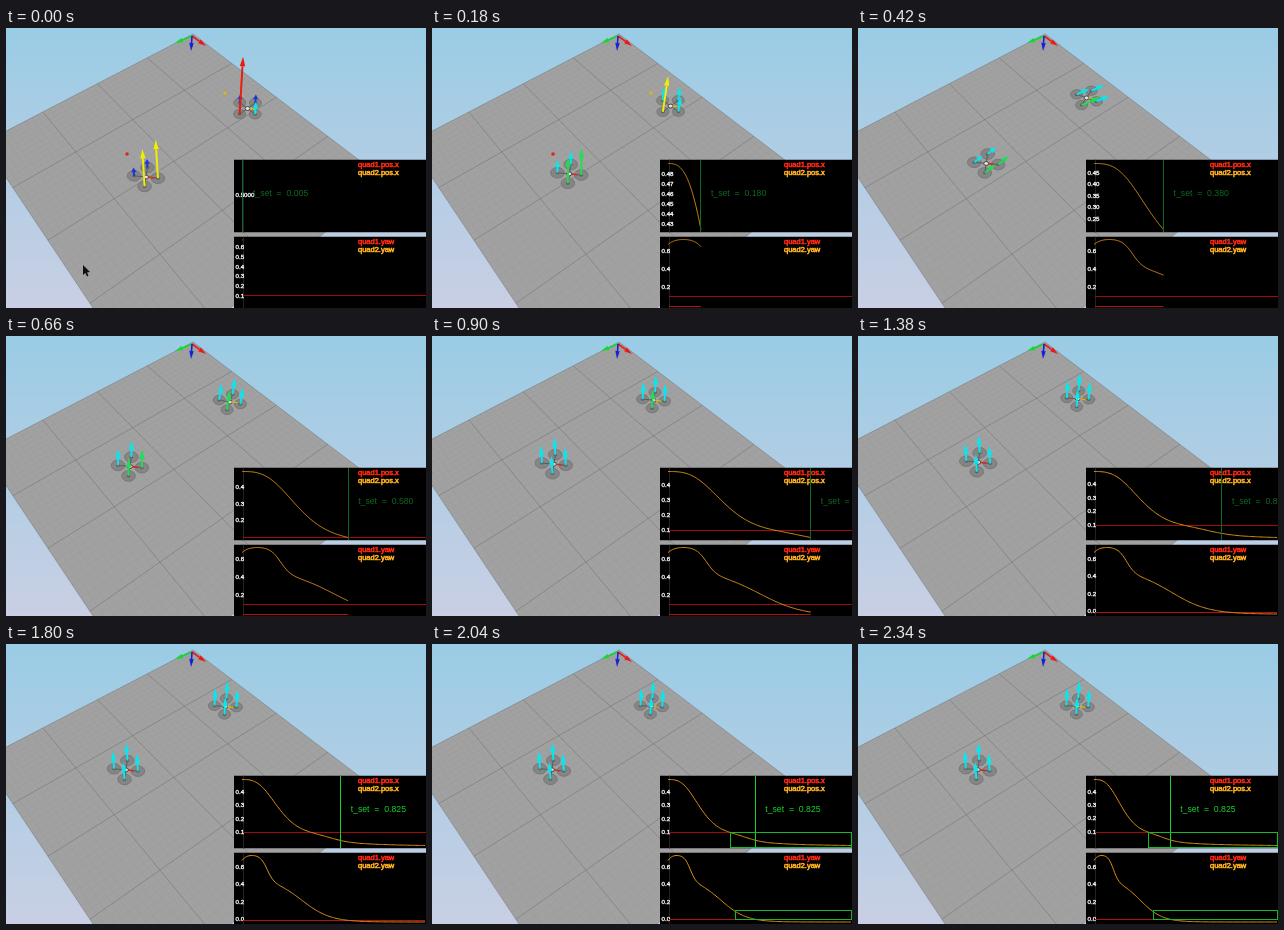
An HTML page with a canvas for the animation above (2.4 s loop, 420 by 280 pixels).

```html
<!DOCTYPE html>
<html lang="en">
<head>
<meta charset="utf-8">
<title>Two quadrotors settling</title>
<style>
html, body { margin: 0; width: 100%; height: 100%; overflow: hidden; }
canvas { display: block; width: 420px; height: 280px; }
</style>
</head>
<body>
<canvas id="stage" width="420" height="280"></canvas>
<script>
const ctx = document.getElementById('stage').getContext('2d');
const STEP = 60, LOOP = 2400, SETTLED = 0.825, LIMIT = 0.095, AXIS = 236;

const bump = (x, center, width) => Math.exp(-(((x - center) / width) ** 2));
const drop = (x, center, width) => 1 / (1 + Math.exp((x - center) / width));
const snap = v => Math.floor(v) + .5;

// Simulated responses over simulation time
const posX = t => .49 / (1 + (t / .336) ** 3) + .022 * bump(t, .65, .18) - .004 * t;
const yaw = t => .29 * drop(t, .21, .028) + .5 * drop(t, .5, .12) - .077 * Math.exp(-t / .04) - .033;

function line(x0, y0, x1, y1, color, width = 1) {
  ctx.strokeStyle = color;
  ctx.lineWidth = width;
  ctx.beginPath();
  ctx.moveTo(x0, y0);
  ctx.lineTo(x1, y1);
  ctx.stroke();
}
function polygon(points, color) {
  ctx.fillStyle = color;
  ctx.beginPath();
  points.forEach(p => ctx.lineTo(p[0], p[1]));
  ctx.closePath();
  ctx.fill();
}
function ellipse(x, y, rx, ry, fill, stroke) {
  ctx.beginPath();
  ctx.ellipse(x, y, rx, ry, 0, 0, 7);
  ctx.fillStyle = fill;
  ctx.fill();
  if (stroke) {
    ctx.strokeStyle = stroke;
    ctx.lineWidth = 1;
    ctx.stroke();
  }
}
function text(str, x, y, size, color, weight = 0) {
  ctx.font = size + 'px "Liberation Sans", Arial, sans-serif';
  ctx.textBaseline = 'middle';
  ctx.fillStyle = ctx.strokeStyle = color;
  ctx.lineWidth = weight;
  ctx.fillText(str, x, y);
  if (weight) ctx.strokeText(str, x, y);
}
function arrow(x, y, dx, dy, color, width) {
  const len = Math.hypot(dx, dy), ux = dx / len, uy = dy / len;
  const head = Math.min(len * .55, width * 5), half = width * 1.4;
  const nx = x + dx - ux * head, ny = y + dy - uy * head;
  line(x, y, nx, ny, color, width);
  polygon([[x + dx, y + dy], [nx - uy * half, ny + ux * half], [nx + uy * half, ny - ux * half]], color);
}

// Floor: projective map of the unit square
const FAR = [187, 6], RIGHT = [382, 154], NEAR = [135, 352], LEFT = [-23, 115];
const project = (() => {
  const sx = FAR[0] - RIGHT[0] + NEAR[0] - LEFT[0], sy = FAR[1] - RIGHT[1] + NEAR[1] - LEFT[1];
  const ax = RIGHT[0] - NEAR[0], ay = RIGHT[1] - NEAR[1];
  const bx = LEFT[0] - NEAR[0], by = LEFT[1] - NEAR[1];
  const det = ax * by - bx * ay, g = (sx * by - bx * sy) / det, h = (ax * sy - sx * ay) / det;
  return (u, v) => {
    const w = g * u + h * v + 1;
    return [0, 1].map(k => ((RIGHT[k] * (1 + g) - FAR[k]) * u
      + (LEFT[k] * (1 + h) - FAR[k]) * v + FAR[k]) / w);
  };
})();

function drawScene() {
  const sky = ctx.createLinearGradient(0, 0, 0, 280);
  sky.addColorStop(0, '#9acce5');
  sky.addColorStop(1, '#c9cfe4');
  ctx.fillStyle = sky;
  ctx.fillRect(0, 0, 420, 280);
  polygon([FAR, RIGHT, NEAR, LEFT], '#a1a1a1');
  for (let i = 0; i <= 40; i++) {
    const k = i / 40, color = i % 10 ? 'rgba(70,70,70,.05)' : 'rgba(70,70,70,.36)';
    line(...project(k, 0), ...project(k, 1), color, .8);
    line(...project(0, k), ...project(1, k), color, .8);
  }
  arrow(186, 8, -17, 7, '#12d92c', 1.6);
  arrow(186, 8, 14, 10, '#ee1717', 1.6);
  arrow(186, 8, -1, 15, '#1722d8', 1.6);
}

// push: extra initial thrust of the left, top, right and bottom rotors
const quads = [
  { x: 120, y: 126, dx: 20, dy: 23, rx: 12, ry: 9.5, size: 6.8, spin: 0, target: [121, 126], mark: '#d82a16',
    push: [-9, -9, 21, 20], lean: .95, rest: -.06, squash: .35 },
  { x: 219.5, y: 62.5, dx: 22, dy: 18, rx: 11, ry: 8, size: 6, spin: 1, target: [219, 65], mark: '#d8b414',
    push: [-9, -9, -5, 40], lean: 1.1, rest: .06, squash: .15 }
];

function thrustColor(force) {
  if (force < 12) return '#1d35dc';
  if (force < 18.2) return '#08e6ee';
  if (force < 30) return '#20dd55';
  return force < 45 ? '#eef000' : '#f01808';
}

function drawQuad(q, n, t) {
  const k = posX(t) / .49, x = q.x + q.dx * k, y = q.y + q.dy * k;
  const turn = .12 + q.spin * yaw(t);
  const rotors = [2, 3, 0, 1].map(i => {
    const a = i * Math.PI / 2 + turn;
    return [x + q.rx * Math.cos(a), y + q.ry * Math.sin(a)];
  });
  if (t < .25) ellipse(...q.target, 1.8, 1.8, q.mark);
  rotors.forEach(([rx, ry]) => ellipse(rx, ry, q.size, q.size * .78, 'rgba(128,128,128,.85)', '#787878'));
  rotors.forEach(([rx, ry]) => {
    line(x, y, rx, ry, '#5c5c5c');
    ellipse(rx, ry, 1.8, 1.5, '#606060');
  });
  ellipse(x, y, 2.5, 2, '#dedede', '#444');
  line(x + 2, y, x + 8, y + 1, q.mark, 1.4);

  const tilt = bump(n, 7, 2.5), angle = q.rest + q.lean * tilt;
  [1, 0, 2, 3].forEach(i => {
    const force = 17.5 + q.push[i] * Math.exp(-n / 4), len = force * (1 - q.squash * tilt);
    arrow(...rotors[i], len * Math.sin(angle), -len * Math.cos(angle), thrustColor(force), 1.9);
  });
}

function niceStep(raw) {
  const base = 10 ** Math.floor(Math.log10(raw));
  return base * [1, 2, 5, 10].find(m => m * base >= raw);
}

function drawGraph(g, t) {
  const span = Math.max(1, t), toX = s => AXIS + 183 * s / span;
  const samples = Array.from({ length: 161 }, (_, i) => t * i / 160);
  const values = samples.map(g.fn);
  const max = Math.max(...values), min = Math.min(g.floor, ...values);
  const range = max - min, toY = v => g.high + (max - v) / range * (g.low - g.high);
  const level = (v, end, color) => line(AXIS + 1, snap(toY(v)), end, snap(toY(v)), color);
  ctx.save();
  ctx.beginPath();
  ctx.rect(228, g.top, 192, g.height);
  ctx.clip();
  ctx.fillStyle = '#000';
  ctx.fillRect(228, g.top, 192, g.height);
  line(237.5, g.top, 237.5, g.top + g.height, '#222');
  if (range < .002) {
    text('0.5000', 229.5, 167, 6.2, '#eee', .4);
  } else {
    const step = niceStep(range / 7), digits = Math.max(1, Math.ceil(-Math.log10(step) - 1e-6));
    for (let i = Math.ceil(min / step); i * step < max; i++) {
      const y = toY(i * step);
      if (y > g.high + 4 && y < g.last) text((i * step).toFixed(digits), 229.5, y + .5, 6.2, '#eee', .4);
    }
    if (!g.trace || t <= 1) level(LIMIT, 420, '#a00c0c');
    if (g.trace) level(-.01, toX(t), '#b81010');
    ctx.strokeStyle = '#dc8f18';
    ctx.lineWidth = 1;
    ctx.beginPath();
    samples.forEach((s, i) => ctx.lineTo(toX(s), toY(values[i])));
    ctx.stroke();
  }
  text('quad1.' + g.name, 352, g.legend, 7.5, '#ff2814', .6);
  text('quad2.' + g.name, 352, g.legend + 8, 7.5, '#ffb020', .6);
  ctx.restore();
  return { toX, toY };
}

const posGraph = { fn: posX, floor: Infinity, name: 'pos.x', top: 131.5, height: 73, high: 135.5, low: 201.5, last: 196, legend: 137 };
const yawGraph = { fn: yaw, floor: -.01, name: 'yaw', top: 208.5, height: 72, high: 211.5, low: 278, last: 275.5, legend: 213.5, trace: true };

function drawBand(left, top, height) {
  ctx.strokeStyle = '#16b82a';
  ctx.lineWidth = 1;
  ctx.strokeRect(snap(left), snap(top), 419.5 - snap(left), height);
}

function drawPanels(n, t) {
  const pos = drawGraph(posGraph, t), ang = drawGraph(yawGraph, t);
  const mark = Math.min(t, SETTLED), x = pos.toX(mark);
  const color = n >= 26 ? '#14d42e' : '#0c6a22';
  line(snap(x), 132, snap(x), 204, color);
  text('t_set  =  ' + mark.toFixed(3), x + 10, 166, 8.7, color);
  if (n < 34) return;
  drawBand(pos.toX(.59), pos.toY(LIMIT), 15);
  drawBand(ang.toX(.64), ang.toY(LIMIT), 9);
}

function drawPointer() {
  polygon([[77, 237], [77, 247], [79.3, 245], [81, 248.5], [82.5, 247.7], [81, 244.5], [84, 244]], '#111');
}

function draw(now) {
  const n = Math.floor(now % LOOP / STEP), t = n ? .03 + .05 * n : .005;
  drawScene();
  quads.forEach(q => drawQuad(q, n, t));
  if (n < 3) drawPointer();
  drawPanels(n, t);
}

let start;
function tick(now) {
  start ??= now;
  draw(now - start);
  requestAnimationFrame(tick);
}
draw(0);
requestAnimationFrame(tick);
</script>
</body>
</html>
```
